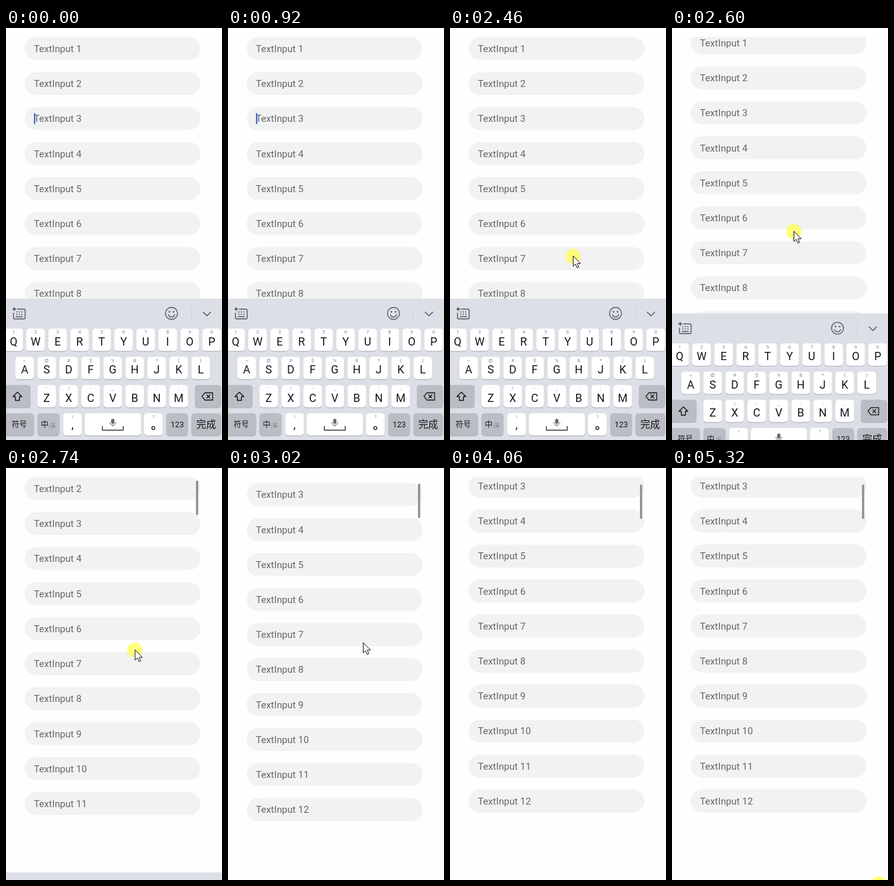
Animation of 341x650 px, one loop 5450 ms. Source, as an HTML page with a canvas:

```html
<!DOCTYPE html>
<html lang="en">
<head>
<meta charset="utf-8">
<title>Scrolling list dismisses the keyboard</title>
<style>
html, body { margin: 0; width: 100%; height: 100%; overflow: hidden; background: #fefefe; }
canvas { display: block; width: 341px; height: 650px; }
</style>
</head>
<body>
<canvas id="stage"></canvas>
<script>
const W = 341, H = 650, LOOP = 5450, STEP = 70;
const LATIN = 'Roboto, sans-serif';
const CJK = '"Noto Sans CJK SC", "Noto Sans CJK", sans-serif';
const INK = '#151619', ICON = '#55585e', DARK_KEY = '#babdc4';

const canvas = document.getElementById('stage');
const ratio = window.devicePixelRatio || 1;
canvas.width = W * ratio;
canvas.height = H * ratio;
const ctx = canvas.getContext('2d');

// Bursts of motion: [start, number of steps]; the picture holds in between.
const bursts = [[0, 1], [1380, 6], [2460, 8], [3020, 8], [3570, 8], [5320, 1]];
const pointerKeys = [
  [0, 300, 700], [1380, 294, 637], [1450, 266, 570], [1520, 239, 500],
  [1590, 217, 435], [1660, 203, 390], [1730, 195, 368], [2460, 194, 360],
  [2600, 192, 321], [2670, 197, 303], [2740, 203.3, 287.2], [2810, 209, 280],
  [2880, 213, 275], [3230, 213, 277], [3500, 241, 411], [3570, 246, 436],
  [4060, 315, 654], [5320, 326, 656]
];
const dragKeys = [[2460, 0], [2530, 1], [2600, 9], [2670, 31], [2740, 55]];
const keyboardKeys = [[2530, 0], [2600, 23.3], [2670, 112], [2740, 211], [2810, 240]];

function heldTime(t) {
  const [start, count] = bursts.filter(b => b[0] <= t).pop();
  return start + STEP * Math.min(count - 1, Math.floor((t - start) / STEP));
}

function sample(keys, t, column = 1) {
  if (t <= keys[0][0]) return keys[0][column];
  const next = keys.findIndex(k => k[0] > t);
  if (next < 0) return keys[keys.length - 1][column];
  const a = keys[next - 1], b = keys[next];
  return a[column] + (b[column] - a[column]) * (t - a[0]) / (b[0] - a[0]);
}

function scrollAt(t) {
  return t < 2740 ? sample(dragKeys, t) : 114.5 - 59.4 * Math.exp((2740 - t) / 189);
}

function box(x, y, w, h, r, color) {
  ctx.fillStyle = color;
  ctx.beginPath();
  ctx.roundRect(x, y, w, h, r);
  ctx.fill();
}

function disc(x, y, r, color) {
  box(x - r, y - r, 2 * r, 2 * r, r, color);
}

function text(str, x, y, size, color, font = LATIN, weight = 400, align = 'center') {
  ctx.font = `${weight} ${size}px ${font}`;
  ctx.textAlign = align;
  ctx.fillStyle = color;
  ctx.fillText(str, x, y);
}

function line(path, color = ICON, width = 1.4) {
  ctx.strokeStyle = color;
  ctx.lineWidth = width;
  ctx.lineCap = ctx.lineJoin = 'round';
  ctx.stroke(new Path2D(path));
}

function key(x, y, w, color = '#fff') {
  box(x, y + 1.2, w, 35.3, 5, '#b0b4bd');
  box(x, y, w, 35.3, 5, color);
}

function letterRow(letters, hints, x, y) {
  [...letters].forEach((letter, i) => {
    const cx = x + 34.75 * i;
    key(cx - 14.7, y, 29.4);
    text(hints[i], cx, y + 8, 8, '#85888e');
    text(letter, cx, y + 26.5, 17.5, INK);
  });
}

function drawToolbar() {
  line('M18 443.5H28Q30.3 443.5 30.3 446V456.5Q30.3 459 28 459H14Q11.7 459 11.7 456.5V450');
  line('M16 455.5H26', ICON, 1.5);
  for (let i = 0; i < 6; i++) {
    box(16.2 + 4 * (i % 3), 447 + 3.7 * Math.floor(i / 3), 1.8, 1.8, .5, ICON);
  }
  ctx.fillStyle = ICON;
  ctx.fill(new Path2D('M13 439.5Q13.4 443 17 443.5Q13.4 444 13 447.5Q12.6 444 9 443.5Q12.6 443 13 439.5Z'));

  line('M251.8 450.3a9.5 9.5 0 1 0 19 0a9.5 9.5 0 1 0-19 0M256.5 452.3Q257.5 456 261.3 456T266.1 452.3');
  disc(258, 447.7, 1.3, ICON);
  disc(264.6, 447.7, 1.3, ICON);
  line('M292.5 442V459', '#cdd0d7', 1);
  line('M311.3 448.2L317.2 454L323.1 448.2', ICON, 1.5);
}

function drawKeyboard() {
  ctx.fillStyle = '#dddfe7';
  ctx.fillRect(0, 427, W, 260);
  drawToolbar();
  letterRow('QWERTYUIOP', '1234567890', 12, 474.3);
  letterRow('ASDFGHJKL', '~@#$%&*()', 29.4, 518.8);
  letterRow('ZXCVBNM', "'/-_:;,", 64.2, 563.2);

  key(-4, 563.2, 43, DARK_KEY);
  line('M18 574.5L25 581.5H21.3V587.5H14.7V581.5H11Z', INK);
  key(298, 563.2, 41.5, DARK_KEY);
  line('M309.3 581.2L314 575.5H326.3V587H314ZM317 578.8L321.8 583.7M321.8 578.8L317 583.7', INK, 1.3);

  const y = 607.7;
  key(-4, y, 48.3, DARK_KEY);
  text('符号', 21, 630, 12, INK, CJK, 500);
  key(49.7, y, 34.7, DARK_KEY);
  text('中', 61, 630, 12, INK, CJK, 500);
  text('/英', 73, 630, 8, '#777a80', CJK);
  key(90.3, y, 29.5);
  text('!', 105, 616, 8, '#85888e');
  text(',', 105, 632, 18, INK);
  key(124.3, y, 88.8);
  box(166, 616.5, 5.2, 8, 2.6, '#66696e');
  line('M164 622Q164.3 626.6 168.6 626.6T173.2 622M168.6 626.6V628.5', '#66696e', 1);
  line('M152.2 628.5V634.5H185V628.5', '#333', 1.4);
  key(218, y, 29.5);
  text('?', 232.8, 616, 8, '#85888e');
  line('M230.2 631.2a2.4 2.4 0 1 0 4.8 0a2.4 2.4 0 1 0-4.8 0', INK, 1.3);
  key(253, y, 34.3, DARK_KEY);
  text('123', 270.2, 630, 12.5, INK);
  key(292.7, y, 46.8, DARK_KEY);
  text('完成', 316, 631, 15.5, INK, CJK, 500);
}

function drawList(scroll) {
  ctx.save();
  ctx.beginPath();
  ctx.rect(0, 14, W, 546);
  ctx.clip();
  for (let i = 0; i < 12; i++) {
    const y = 14.2 + 55.22 * i - scroll;
    box(29.5, y, 277.5, 36.5, 18.25, '#f2f2f2');
    text(`TextInput ${i + 1}`, 44, y + 23.7, 15.15, '#666', LATIN, 400, 'left');
  }
  ctx.restore();
}

function drawPointer(x, y, pressed) {
  if (pressed) disc(x, y, 12, 'rgba(255,255,80,.74)');
  ctx.save();
  ctx.translate(x + .5, y);
  const arrow = 'M0 0V15.8L3.7 12.5L6.2 18.3L8.8 17.2L6.4 11.5H11.1Z';
  ctx.fillStyle = '#fff';
  ctx.fill(new Path2D(arrow));
  line(arrow, '#111', 1);
  ctx.restore();
}

function draw(t) {
  const held = heldTime(t);
  const scroll = scrollAt(held);
  ctx.setTransform(ratio, 0, 0, ratio, 0, 0);
  ctx.fillStyle = '#fefefe';
  ctx.fillRect(0, 0, W, H);
  drawList(scroll);

  const caretOn = t < 390 || (t >= 920 && t < 1450) || (t >= 1930 && t < 2460);
  if (caretOn) box(44.2, 134.3, 2, 17.5, 1, '#2f5bdc');
  if (held >= 2670) box(299.9, 14 + .105 * scroll, 3.6, 54.5, 1.8, '#929292');

  const drop = sample(keyboardKeys, held);
  if (drop < 223) {
    ctx.save();
    ctx.translate(0, drop);
    drawKeyboard();
    ctx.restore();
  }

  const pressed = (t >= 2130 && t < 2810) || t >= 5320;
  drawPointer(sample(pointerKeys, held), sample(pointerKeys, held, 2), pressed);
}

const began = performance.now();
function frame() {
  draw((performance.now() - began) % LOOP);
  requestAnimationFrame(frame);
}
frame();
</script>
</body>
</html>
```
